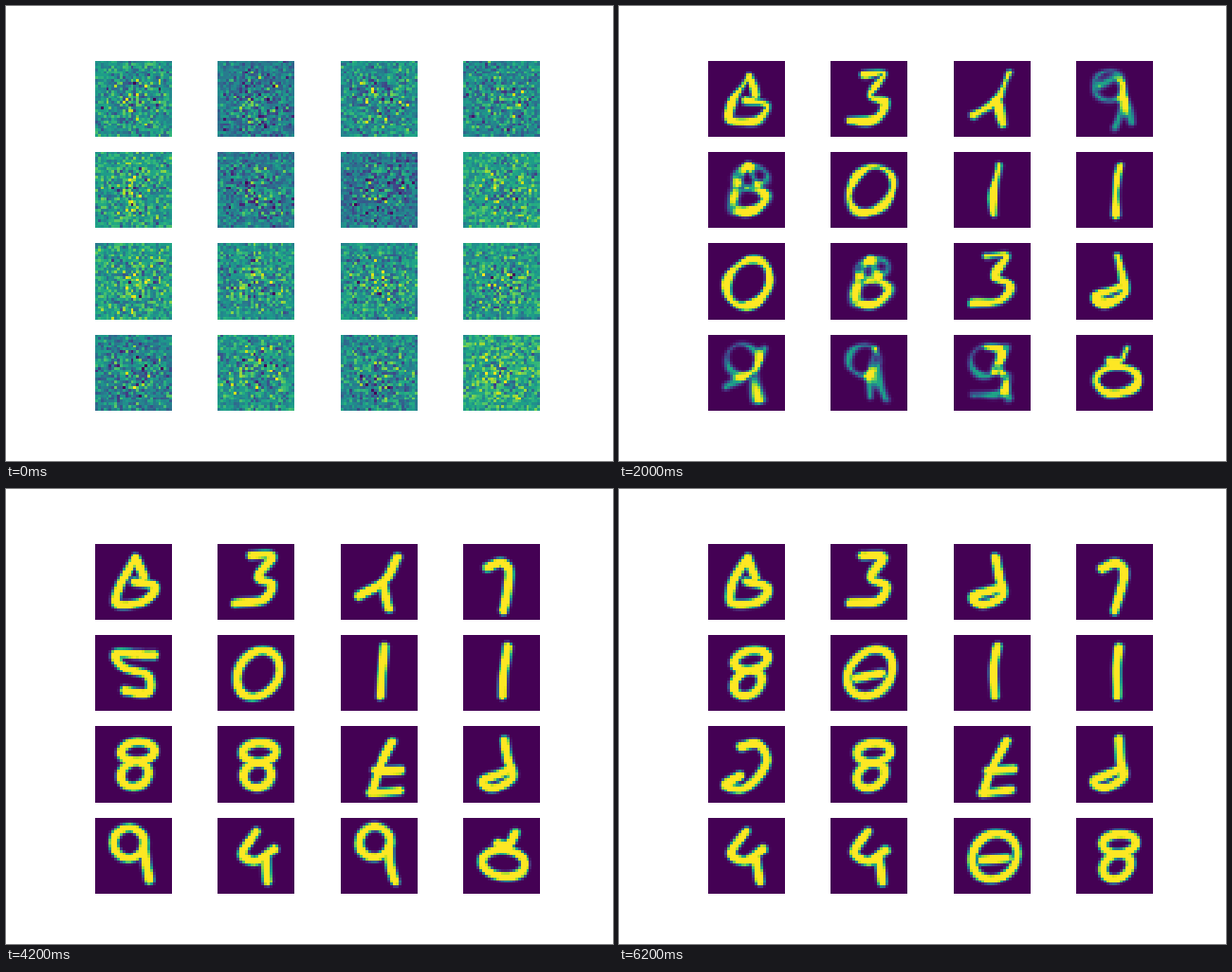
Animation, 640 px wide and 480 px high, one loop 6300 ms. Source, as a matplotlib script:

```python
import numpy as np
import matplotlib.pyplot as plt
from matplotlib.animation import FuncAnimation

CELLS, SIDE = 28, 80
EPOCHS = 32
SAMPLES = 60

centres = (np.arange(CELLS) + 0.5) * SIDE / CELLS
gx, gy = np.meshgrid(centres, centres)
cols, rows = np.meshgrid(np.arange(CELLS), np.arange(CELLS))


def path(*coords):
    """Smooth line through a few points."""
    p = np.array(coords, float).reshape(-1, 2)
    slope = np.gradient(p, axis=0)
    t = np.linspace(0, len(p) - 1, SAMPLES)
    i = np.minimum(t.astype(int), len(p) - 2)
    f = (t - i)[:, None]
    return ((2 * f**3 - 3 * f**2 + 1) * p[i] + (f**3 - 2 * f**2 + f) * slope[i]
            + (3 * f**2 - 2 * f**3) * p[i + 1] + (f**3 - f**2) * slope[i + 1])


def ring(cx, cy, rx, ry, slant=0.2):
    """Closed oval leaning to the right."""
    a = np.linspace(0, 2 * np.pi, SAMPLES)
    dy = ry * np.sin(a)
    return np.column_stack([cx + rx * np.cos(a) - slant * dy, cy + dy])


# Pen strokes of each handwritten shape, on a tile of 80 by 80
GLYPHS = {
    "0": [ring(42, 41, 22, 24)],
    "e": [ring(42, 41, 23, 24), path(28, 46, 54, 42)],
    "1": [path(46, 14, 42, 40, 42, 65)],
    "2": [path(34, 22, 52, 18, 60, 34, 50, 54, 34, 66, 18, 62, 32, 52)],
    "3": [path(34, 14, 56, 14, 42, 36, 57, 44, 48, 60, 20, 63)],
    "4": [path(40, 16, 25, 38, 40, 47, 58, 34), path(50, 42, 53, 68)],
    "5": [path(62, 22, 24, 20, 30, 34, 54, 42, 54, 60, 30, 58)],
    "6": [path(42, 16, 26, 42, 24, 63, 50, 62, 62, 47, 40, 41), path(42, 16, 50, 36)],
    "7": [path(26, 26, 40, 20, 49, 28, 47, 48, 41, 70)],
    "8": [ring(44, 27, 17, 10), ring(42, 51, 14, 13)],
    "9": [ring(35, 27, 16, 16, 0), path(50, 30, 52, 48, 57, 67)],
    "d": [path(44, 14, 47, 36, 50, 54, 30, 64, 20, 56, 44, 47)],
    "o": [ring(43, 48, 22, 14, 0), path(36, 28, 48, 28, 54, 16)],
    "t": [path(54, 16, 42, 40, 32, 66), path(36, 46, 62, 46), path(30, 69, 60, 67)],
    "y": [path(58, 14, 46, 40, 20, 56), path(46, 46, 50, 68)],
}

# What the sixteen tiles resemble at some stages of training
STAGES = {
    2: "8181701177117106",
    7: "63y76011063dy13o",
    13: "63y98011083d999o",
    21: "63y7501188td949o",
    27: "63d78e1108td9488",
    31: "63d78e1128td44e8",
}
KEYS = list(STAGES)
BRIGHTNESS = [.52, .42, .5, .47, .56, .43, .4, .58, .57, .52, .53, .54, .45, .52, .48, .6]


def stroke_distance(glyph, x, y):
    points = np.vstack(GLYPHS[glyph])
    return np.sqrt(((x[..., None] - points[:, 0])**2
                    + (y[..., None] - points[:, 1])**2).min(axis=-1))


def static(tile, rng):
    spread = .09 + .13 * np.exp(-((gx - 42)**2 + (gy - 42)**2) / 1000)
    return BRIGHTNESS[tile] + rng.normal(0, 1, gx.shape) * spread


def picture(tile, epoch):
    rng = np.random.default_rng(1000 * epoch + tile)
    if epoch == 0:
        return static(tile, rng)

    # A slight drift keeps every step different.
    x = gx + np.sin(gy / 13 + epoch + tile)
    y = gy + np.sin(gx / 15 + 2 * epoch + tile)

    # Early strokes are broken, thin above and heavy below.
    phase = np.random.default_rng(tile).uniform(0, 6, 2)
    wave = np.sin(gx / 8 + phase[0]) * np.sin(gy / 8 + phase[1])
    damage = np.interp(epoch, [1, 2, 7, 12], [.5, .6, 1, 0])
    radius = 4.5 + damage * (4 * wave + 5 * gy / SIDE - 4.5)
    blur = np.interp(epoch, [1, 2, 4, 7], [4, 2.6, 1.5, .8])

    place = np.interp(epoch, KEYS, np.arange(len(KEYS)))
    k = min(int(place), len(KEYS) - 2)
    mix = place - k
    near, after = (stroke_distance(STAGES[KEYS[j]][tile], x, y) for j in (k, k + 1))
    level_a, level_b = (np.clip((radius - d) / blur, -4, 4) for d in (near, after))
    ink = 1 / (1 + np.exp(-(level_a * (1 - mix) + level_b * mix)))
    ink = np.clip(1.2 * (ink - .018), 0, 1)

    # Early outputs show a dotted lattice, stronger to the right.
    haze = np.interp(epoch, [1, 2, 4, 6], [1.3, 1, .3, 0])
    if haze:
        dots = (cols % 2 == 1) & (rows % 2 == 1)
        lattice = .1 + dots * (.1 + .28 * gx / SIDE) * rng.uniform(.5, 1.2, gx.shape)
        lattice += rng.normal(0, .025, gx.shape)
        ink *= 1 - .4 * min(haze, 1) * rng.random(gx.shape)
        ink = np.maximum(ink, haze * lattice * np.clip(near / 22, .3, 1))
    if epoch == 1:
        ink = .7 * ink + .3 * static(tile, rng)
    return ink


fig, axes = plt.subplots(4, 4, figsize=(6.4, 4.8), dpi=100)
tiles = []
for ax in axes.flat:
    ax.axis("off")
    tiles.append(ax.imshow(np.zeros((CELLS, CELLS)), cmap="viridis",
                           vmin=0, vmax=1, interpolation="nearest"))

gallery = [[picture(t, e) for t in range(len(tiles))] for e in range(EPOCHS)]


def update(frame):
    for tile, data in zip(tiles, gallery[frame // 2]):
        tile.set_data(data)
    return tiles


anim = FuncAnimation(fig, update, frames=63, interval=100, repeat=True, repeat_delay=0)
plt.show()
```
